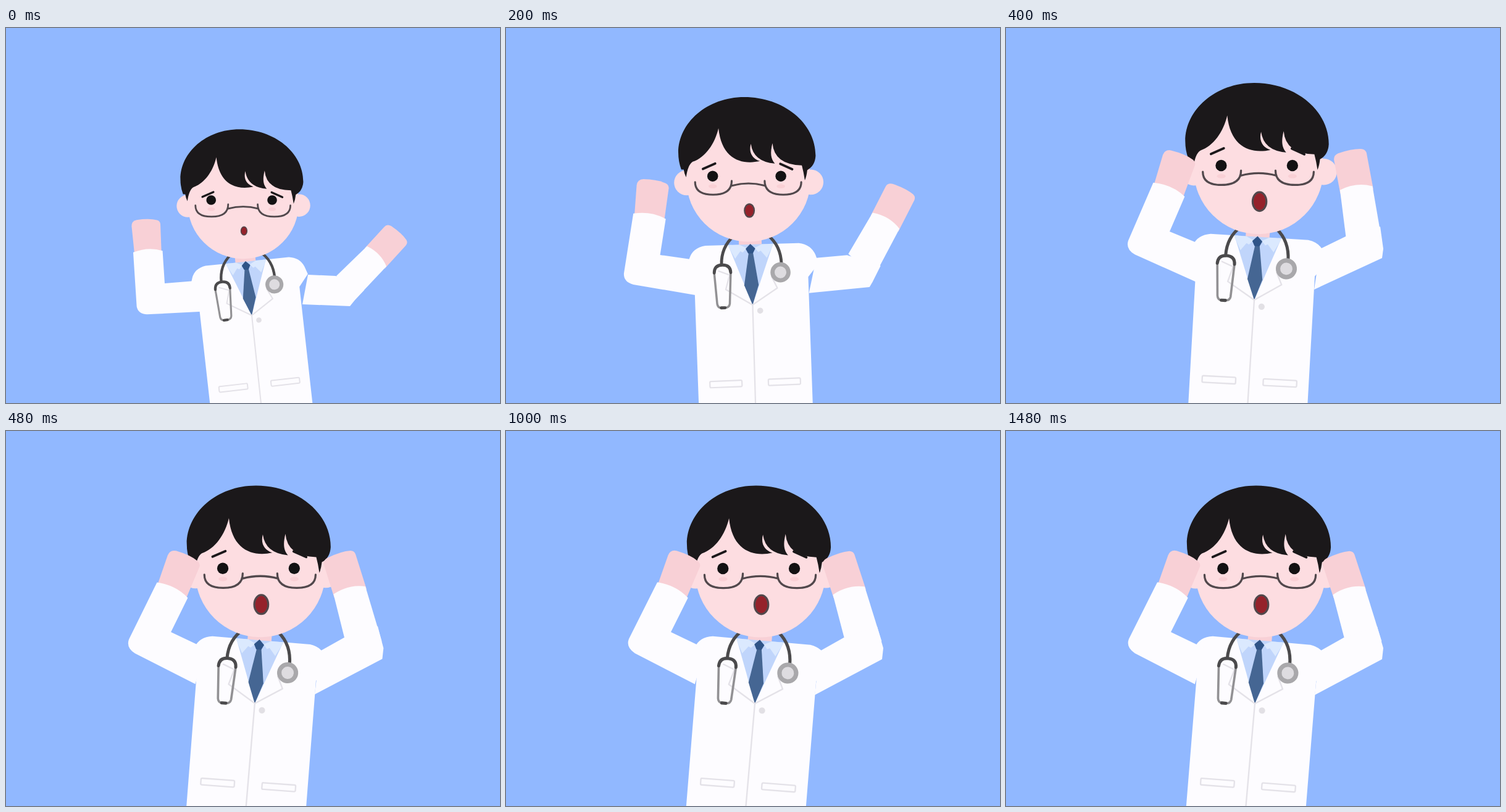
Recreate the animation shown at these times as an HTML page. Size 800 px wide and 608 px high, loop 1520 ms.

```html
<!DOCTYPE html>
<html lang="en">
<head>
<meta charset="utf-8">
<title>Worried doctor</title>
<style>
  html, body { margin: 0; height: 100%; overflow: hidden; background: #91b8ff; }
  svg { display: block; width: 100vw; height: 100vh; }
  .line { fill: none; stroke-linecap: round; stroke-linejoin: round; }
  .coat { fill: #fdfcff; }
  .skin { fill: #fddde1; }
  .hand { fill: #f8d0d6; }
  .seam { stroke: #e4e2e8; stroke-width: 2.3; }
  .tube { stroke: #4b4a4c; stroke-width: 5; }
  .steel { stroke: #929194; stroke-width: 3.6; }
  .frame { stroke: #51484c; stroke-width: 3.2; }
  .brow { stroke: #1b181a; stroke-width: 3.8; }
</style>
</head>
<body>
<svg viewBox="0 0 800 608">
  <g id="body">
    <path class="hand" d="M380 320H418V348H380Z"/>
    <path class="coat" d="M306 700L304 400L292 378L297 363Q303 346 324 343H367L400 352L433 343H480Q500 346 507 363L512 378L494 400L496 700Z"/>
    <path fill="#c0d5fb" d="M362 343H437L400 444Z"/>
    <path fill="#dbe9fe" d="M361 343H381L393 349L386 356L382 354L373 366ZM438 343H418L406 349L412 356L416 354L426 366Z"/>
    <path fill="#456693" d="M396 356H403L411 411L400 444L387 411Z"/>
    <path fill="#2f5488" d="M399 342L407 350L403 358H395L391 350Z"/>
    <path class="line seam" d="M345 386L363 393L356 417L400 444L442 417L433 398M400 444V700"/>
    <rect class="line seam" x="325" y="569.5" width="53.5" height="10.5" rx="2" transform="rotate(-.6 352 575)"/>
    <rect class="line seam" x="422.5" y="568.5" width="53.5" height="10.5" rx="2" transform="rotate(-.6 449 574)"/>
    <circle cx="412.3" cy="454" r="5" fill="#e2e0e5"/>
    <path class="line tube" d="M372 328Q350 346 350 376M428 328Q450 346 450 378"/>
    <path class="line steel" d="M337.5 389L341 441Q342 447.500 348 447.500H354Q361 447.500 362 441L365 389"/>
    <path class="line tube" d="M337.500 389Q338 376 351 376Q365 376 365 389"/>
    <path class="line tube" d="M347.500 447.500H354"/>
    <circle cx="448" cy="391" r="16.800" fill="#a9a8ab"/>
    <circle cx="448" cy="391" r="9.800" fill="#dedce0"/>
  </g>

  <g id="head">
    <g class="skin">
      <circle cx="294" cy="240" r="21"/>
      <circle cx="501" cy="239" r="21"/>
      <circle cx="397" cy="235" r="103.500"/>
    </g>
    <path fill="#1b181a" d="M280 190C280 140 328 97 390 97C455 97 509 140 509 195Q508 212 495 219Q494 229 491 236Q489 222 486 211Q440 210 437 174C433 190 434 200 441 208Q405 205 401 175C397 190 404 200 416 204C385 211 352 200 347 149C341 175 325 198 304 205Q296 210 293 231Q290 225 289 218H285Q280 205 280 190Z"/>
    <g fill="#f6c4ca" opacity=".5">
      <ellipse cx="337.500" cy="246" rx="7" ry="3.500"/>
      <ellipse cx="451" cy="246" rx="7" ry="3.500"/>
    </g>
    <g fill="#131213">
      <circle cx="337.300" cy="229" r="9"/>
      <circle cx="451" cy="229" r="9"/>
    </g>
    <path id="brows" class="line brow" d="M321 213.500L341.500 204.500M450 205L470 214"/>
    <path class="line frame" d="M308 239Q308 260 338 260Q369 260 369 237M424 237Q424 260 455 260Q485 260 485 239M369 245Q397 237.500 425 245"/>
    <ellipse id="mouth" cx="398.500" cy="286.500" rx="9" ry="12.300" fill="#95222b" stroke="#51484c" stroke-width="2.600"/>
  </g>

  <g id="leftArm">
    <path id="leftHand" class="hand" d="M214 286L222 233Q224 223 234 223.500Q258 226 271 233.500Q276 237 275 242L263 297Z"/>
    <path class="coat" d="M213 279Q243 277 266 293L251 352L310 366L306 425L202 397Q186 391 188 377Z"/>
  </g>
  <g id="rightForearm">
    <path class="hand" d="M580 285L595 234Q597 226 606 226.500Q630 230 643 237.500Q648 241 646.500 247L630 303Z"/>
    <path class="coat" d="M555 355L582 280Q611 280 631 298L604 385Z"/>
  </g>
  <polygon id="rightUpperArm" class="coat"/>
</svg>
<script>
  const LOOP = 1520, STEP = 40;
  const TIMES = [0, 120, 280, 400, 520];

  // Every track below holds one value per entry of TIMES.
  const SIZE = [.869, .935, 1, 1.015, 1.018];
  const still = [0, 0, 0, 0, 0];
  const parts = [
    { id: "body", pivot: [400, 444], x: [398, 399, 400, 402, 403],
      y: [466, 455, 444, 441, 442], turn: [-6, -3.2, 0, 3.6, 5], size: SIZE },
    { id: "head", pivot: [394, 229], x: [381.5, 386.5, 394, 406, 409],
      y: [279, 254, 229, 223, 223], turn: still, size: SIZE },
    { id: "leftArm", pivot: [251, 352], x: [257, 251, 251, 265, 267],
      y: [414, 385, 352, 330, 326], turn: [-18, -10.5, 0, 9, 12.3], size: SIZE },
    { id: "rightForearm", pivot: [555, 355], x: [535, 551, 555, 551, 550],
      y: [402, 379, 355, 343, 344], turn: [26, 18.5, 0, -27, -34.5], size: SIZE },
  ];
  const upperArm = [
    [[489, 497, 507, 509, 508], [400, 383, 364, 358, 357]],  // shoulder
    [[534, 547, 555, 550, 547], [402, 382, 355, 338, 335]],  // inner elbow
    [[580, 600, 610, 606, 601], [425, 402, 366, 322, 317]],  // outer forearm
    [[565, 584, 602, 611, 611], [441, 426, 394, 358, 352]],  // elbow, upper side
    [[557, 578, 598, 609, 609], [451, 434, 404, 373, 370]],  // elbow, lower side
    [[480, 486, 495, 499, 500], [448, 437, 424, 424, 428]],  // armpit
  ];
  const brows = [9.5, 7, 0, -3, -3];
  const mouth = [.63, .8, 1, 1.22, 1.22];
  const leftWrist = [3.5, 2, 0, -1, -1.5];

  const $ = id => document.getElementById(id);
  const set = (id, name, value) => $(id).setAttribute(name, value);

  // Slope through the neighbouring keys, zero at the final rest.
  function slope(track, i) {
    const last = TIMES.length - 1;
    if (i === last) return 0;
    const a = Math.max(i - 1, 0), b = i + 1;
    return (track[b] - track[a]) / (TIMES[b] - TIMES[a]);
  }

  // Cubic Hermite interpolation of a track.
  function at(track, t) {
    const end = TIMES.findIndex(time => time > t);
    if (end < 0) return track[track.length - 1];
    const start = end - 1, span = TIMES[end] - TIMES[start];
    const u = (t - TIMES[start]) / span, v = 1 - u;
    return v * v * (1 + 2 * u) * track[start] + u * u * (1 + 2 * v) * track[end]
      + u * v * span * (v * slope(track, start) - u * slope(track, end));
  }

  function draw(t) {
    for (const { id, pivot: [px, py], x, y, turn, size } of parts) {
      set(id, "transform", `translate(${at(x, t)} ${at(y, t)}) rotate(${at(turn, t)}) ` +
        `scale(${at(size, t)}) translate(${-px} ${-py})`);
    }
    set("rightUpperArm", "points", upperArm.map(p => p.map(track => at(track, t))).join(" "));
    set("brows", "transform", `translate(0 ${at(brows, t)})`);
    set("mouth", "transform",
      `translate(398.5 286.5) scale(${at(mouth, t)}) translate(-398.5 -286.5)`);
    set("leftHand", "transform", `rotate(${at(leftWrist, t)} 240 285)`);
  }

  function tick() {
    const t = performance.now() % LOOP;
    draw(Math.floor(t / STEP) * STEP);
    requestAnimationFrame(tick);
  }
  tick();
</script>
</body>
</html>
```
